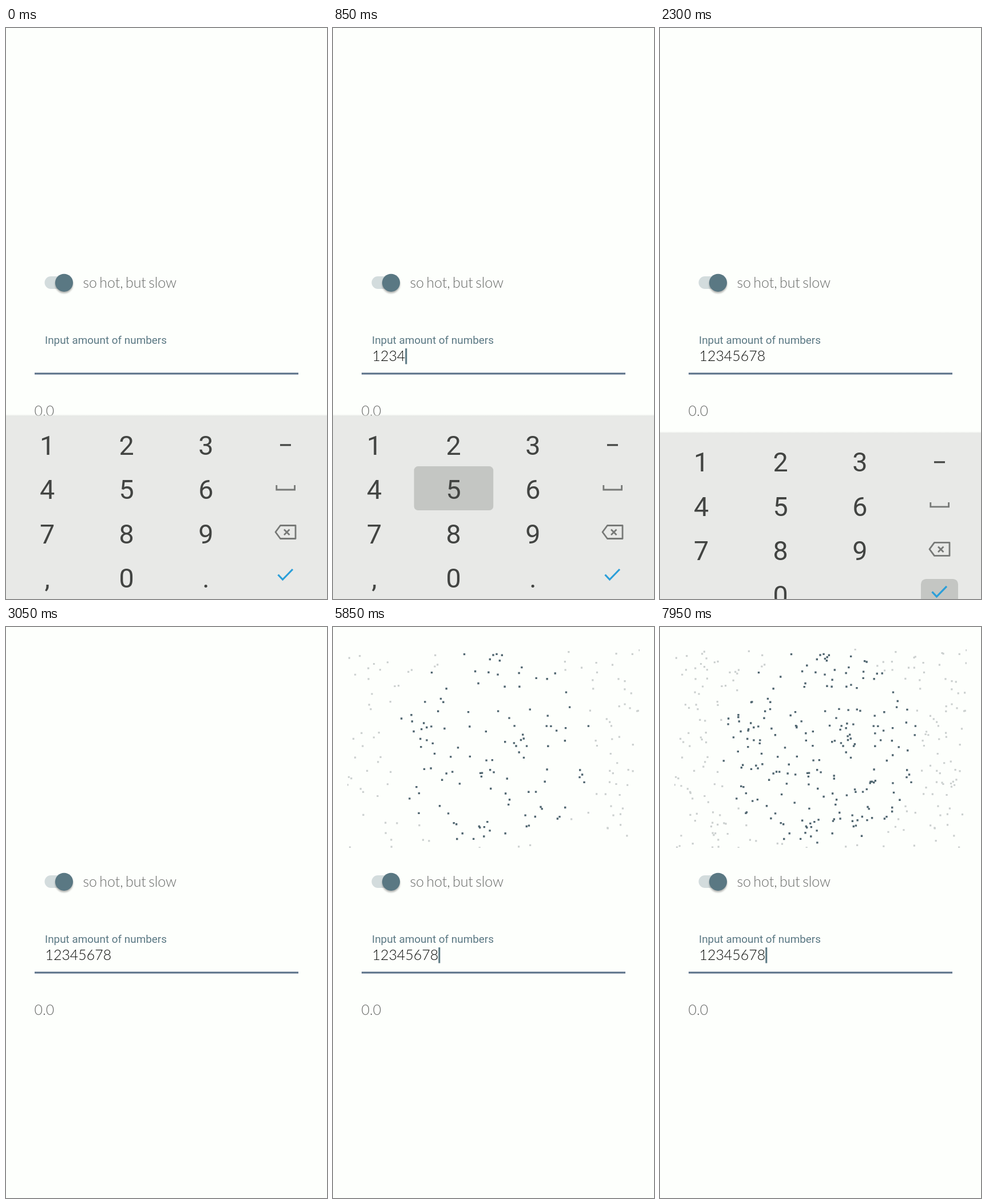
An HTML page that plays this animation: 561x998 px, repeating every 8 s.

```html
<!DOCTYPE html>
<html lang="en">
<head>
<meta charset="utf-8">
<title>Random dots</title>
<style>
html, body { margin: 0; width: 100%; height: 100%; overflow: hidden; background: #fdfffc; }
svg { display: block; }
text { font: 300 24.93px Lato, sans-serif; fill: #686a68; word-spacing: -2.5px; }
.hint { font: 400 18.9px Roboto, sans-serif; fill: #5a7883; word-spacing: 0; }
#value { fill: #0c0e0c; }
#keys text { font: 400 46.7px Roboto, sans-serif; fill: #424442; text-anchor: middle; }
.icon { fill: none; stroke: #777977; stroke-width: 2.8; }
</style>
</head>
<body>
<svg id="stage" width="561" height="998" viewBox="0 0 561 998">
  <defs>
    <linearGradient id="edge" x2="0" y2="1">
      <stop offset="0" stop-color="#e8e9e7" stop-opacity="0"/>
      <stop offset="1" stop-color="#dfe1de"/>
    </linearGradient>
    <filter id="soft" x="-30%" y="-30%" width="160%" height="160%"><feGaussianBlur stdDeviation="1.5"/></filter>
  </defs>

  <svg x="25" y="38" width="511" height="348" viewBox="25 38 511 348">
    <path id="outside" fill="#cbd0cf"/>
    <path id="inside" fill="#506670"/>
  </svg>

  <rect x="67.5" y="434" width="45" height="22" rx="11" fill="#d3dcdd"/>
  <circle cx="101.5" cy="448" r="15.5" fill="#000" opacity=".3" filter="url(#soft)"/>
  <circle cx="101.5" cy="445.3" r="15.6" fill="#5a7883"/>
  <text x="134.5" y="454">so hot, but slow</text>

  <text class="hint" x="68" y="552">Input amount of numbers</text>
  <text id="value" x="68.5" y="582"></text>
  <rect id="cursor" y="560" width="3" height="27.5" fill="#5a7883"/>
  <rect x="50" y="602.5" width="461" height="3.1" fill="#5b7189"/>
  <text x="49.5" y="678">0.0</text>

  <g id="keys">
    <rect y="675" width="561" height="4" fill="url(#edge)"/>
    <rect y="678.5" width="561" height="320" fill="#e8e9e7"/>
    <rect id="press" fill="#c4c6c3"/>
    <rect x="479" y="727.3" width="19" height="3.2" fill="#424442"/>
    <path class="icon" d="M472.8 799v8h31.8v-8"/>
    <path class="icon" stroke-width="2.5" stroke-linejoin="round" d="M471 881l8.500-11.500h26.500v23h-26.500zM486 876.500l9.500 9.500m0-9.500l-9.500 9.500"/>
    <path class="icon" style="stroke:#2b9fd9;stroke-width:3.200" d="M475.500 955.500l8 8.500 17.500-18"/>
  </g>
</svg>
<script>
const $ = id => document.getElementById(id);
const setAll = (el, attrs) => { for (const k in attrs) el.setAttribute(k, attrs[k]); };

[..."123456789,0."].forEach((ch, i) => {
  const label = document.createElementNS("http://www.w3.org/2000/svg", "text");
  setAll(label, { x: 72 + i % 3 * 138.7, y: 745.5 + Math.floor(i / 3) * 77.5 });
  label.textContent = ch;
  $("keys").append(label);
});

// Press and release time of each digit key, 1 to 8
const taps = [[50, 200], [400, 500], [550, 650], [700, 800],
              [850, 950], [1000, 1100], [1150, 1300], [1400, 1550]];

let seed = 7654321;
const random = () => (seed = (seed * 16807) % 2147483647) / 2147483647;
const dots = Array.from({ length: 420 }, () => {
  const x = 25 + random() * 511, y = 38 + random() * 348;
  return { x, y, hit: Math.hypot(x - 281, y - 212) < 174 };
});

function dotPath(count, hit) {
  const s = hit ? 3.4 : 3.2;
  return dots.slice(0, count).filter(d => d.hit === hit)
    .map(d => `M${d.x - s / 2} ${d.y - s / 2}h${s}v${s}h${-s}z`).join("");
}

function drawPress(t) {
  const i = taps.findIndex(([down, up]) => t >= down && t < up);
  const box = i >= 0
    ? { x: 3 + i % 3 * 138.6, y: 689 + Math.floor(i / 3) * 77.1, width: 138.6, height: 77, rx: 7 }
    : { x: 456, y: 933, width: t >= 2050 ? 65 : 0, height: 44, rx: 9 };
  setAll($("press"), box);
}

function draw(t) {
  const typed = taps.filter(tap => t >= tap[1]).length;
  $("value").textContent = "12345678".slice(0, typed);
  const blink = t >= 2550 && Math.floor((t - 2550) / 500) % 2 === 0;
  const shown = blink || (t >= 50 && t < 2050);
  setAll($("cursor"), { x: 68.3 + typed * 14.5, opacity: shown ? 1 : 0 });

  drawPress(t);
  const slide = Math.min(1, Math.max(0, (t - 2250) / 200));
  setAll($("keys"), { transform: `translate(0 ${325 * slide ** 1.72})` });

  const count = Math.max(0, Math.round((t - 3350) * 0.088));
  setAll($("inside"), { d: dotPath(count, true) });
  setAll($("outside"), { d: dotPath(count, false) });
}

const start = performance.now();
function tick() {
  // The picture advances in steps of 50 ms
  const t = (performance.now() - start) % 8000;
  draw(Math.floor(t / 50) * 50);
  requestAnimationFrame(tick);
}
tick();
</script>
</body>
</html>
```
